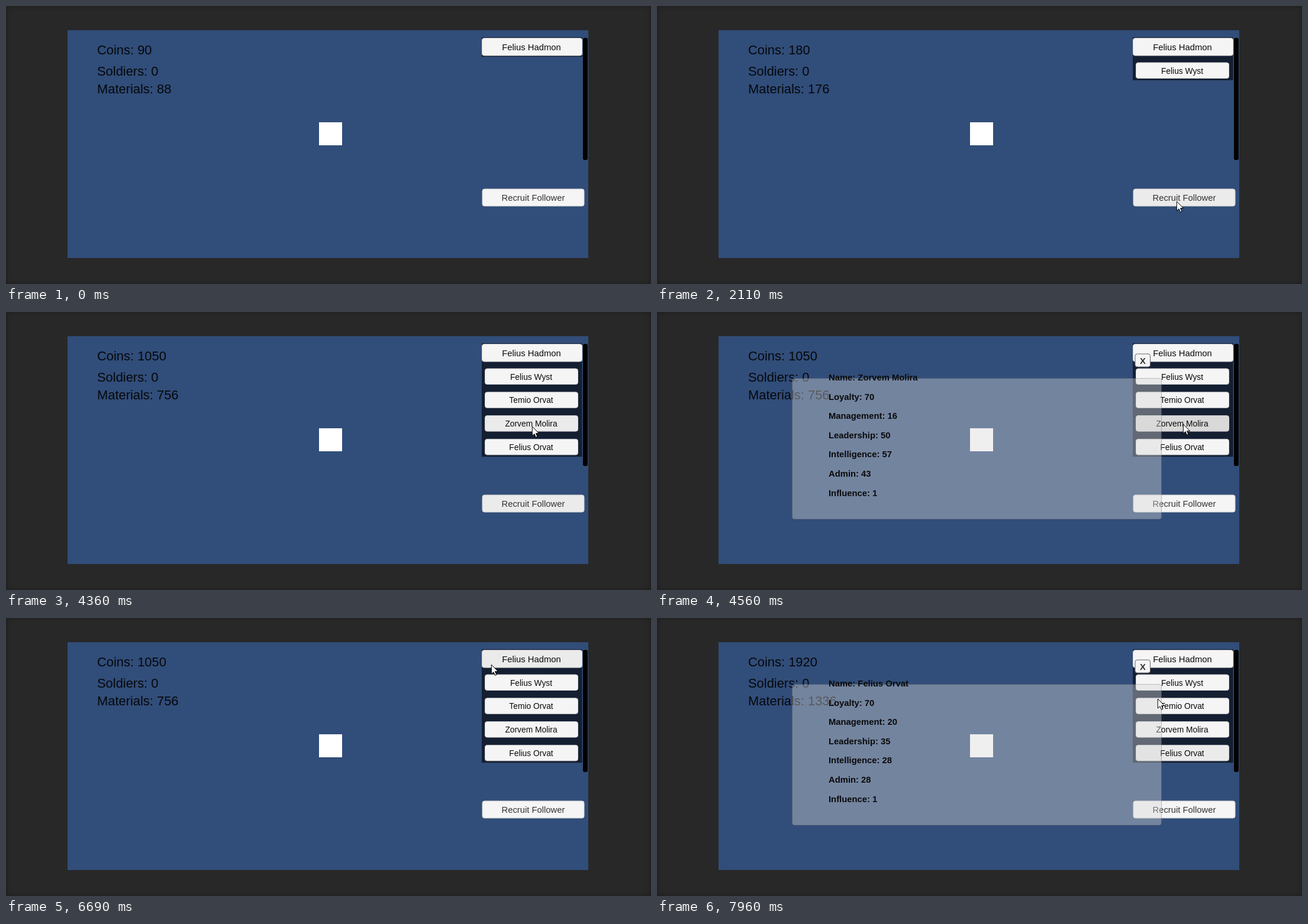
An HTML page that plays this animation: 1090x471 px, repeating every 8 s.

```html
<!DOCTYPE html>
<html lang="en">
<head>
<meta charset="utf-8">
<title>Follower menu</title>
<style>
  html, body { margin: 0; width: 100%; height: 100%; overflow: hidden; background: #282828; }
  body { box-shadow: inset 0 0 9px rgba(0, 0, 0, .3); }
  svg { display: block; width: 100%; height: 100%; }
  text { font: 14.8px "Liberation Sans", Arial, sans-serif; fill: #0a0a0a; white-space: pre; }
  .hud { font-size: 21.9px; fill: #05080c; }
  .row { font-size: 13.8px; }
  .mid { text-anchor: middle; }
  .bold { font-weight: bold; }
  .dim { fill: #323232; }
  .button { stroke: #d2d2d2; }
</style>
</head>
<body>
<svg id="stage" viewBox="0 0 1090 471" xmlns="http://www.w3.org/2000/svg"></svg>
<script>
const LOOP = 8000, FIRST_STEP = 190, STEP = 66.25;
const IDLE = '#f5f5f5', HOVER = '#ebebeb', PRESS = '#e1e1e1', HELD = '#cacaca', RELEASE = '#d9d9d9';
const LABELS = ['Name', 'Loyalty', 'Management', 'Leadership', 'Intelligence', 'Admin', 'Influence'];
const FOLLOWERS = [
  { name: 'Felius Wyst' },
  { name: 'Temio Orvat' },
  { name: 'Zorvem Molira', stats: [70, 16, 50, 57, 43, 1] },
  { name: 'Felius Orvat', stats: [70, 20, 35, 28, 28, 1] }
];

// Times are counted in animation steps. Each move: first step, last step, destination.
const ENTRY = [1000, 471];
const MOVES = [
  [0, 6, 990, 69], [6, 10, 877, 140],
  [12, 18, 878, 340], [18, 20, 876, 321], [26, 29, 878, 331],
  [54, 64, 889, 190], [76, 79, 567, 201],
  [82, 87, 820, 79], [88, 91, 840, 63], [91, 94, 820, 79],
  [99, 107, 858, 231], [110, 117, 846, 137]
];
const click = (on, at, hold = 1) => ({ on, at, hold });
const CLICKS = [
  ...FOLLOWERS.map((_, i) => click('recruit', 22 + 10 * i, 2)),
  click('row2', 65), click('close', 97), click('row3', 108)
];

const stage = document.getElementById('stage');

function add(tag, attrs, parent = stage, content = '') {
  const node = document.createElementNS(stage.namespaceURI, tag);
  for (const key in attrs) node.setAttribute(key, attrs[key]);
  node.textContent = content;
  parent.append(node);
  return node;
}
const rect = (x, y, width, height, fill, more, parent) =>
  add('rect', { x, y, width, height, fill, ...more }, parent);
const label = (x, y, cls, content, parent) => add('text', { x, y, class: cls }, parent, content);
const show = (node, on) => node.setAttribute('visibility', on ? 'visible' : 'hidden');

const buttons = {};
function button(id, x, y, w, h, parent) {
  const face = rect(x, y, w, h, IDLE, { rx: 3.5, class: 'button' }, parent);
  buttons[id] = { face, x, y, w, h };
}

rect(104, 41, 880, 386, '#314d79');
const coins = label(154, 82.2, 'hud', '');
label(154, 118.2, 'hud', 'Soldiers: 0');
const materials = label(154, 148.2, 'hud', '');
rect(529, 197, 39, 39, '#fff');

const list = rect(804, 53, 169.5, 33, '#141f32');
button('lead', 804.5, 54.5, 169, 29.5);
label(888, 75.3, 'mid', 'Felius Hadmon');
const rows = FOLLOWERS.map(({ name }, i) => {
  const row = add('g', {}), y = 96 + 39.8 * i;
  button('row' + i, 809.5, y, 157, 26.5, row);
  label(887.5, y + 18.5, 'row mid', name, row);
  return row;
});
rect(975, 54, 8, 207, '#020202', { rx: 3 });
button('recruit', 805, 310, 172, 29);
label(891, 330, 'mid dim', 'Recruit Follower');

const card = add('g', {});
rect(228.5, 112.5, 624, 238.5, '#d7d7d7', { rx: 4, 'fill-opacity': .4, stroke: '#555', 'stroke-opacity': .35 }, card);
button('close', 808, 71, 25.5, 22, card);
buttons.close.face.style.stroke = '#666';
label(821, 87.5, 'mid bold dim', 'X', card);
const facts = LABELS.map((_, i) => label(290, 116 + 32.6 * i, 'bold', '', card));

const ring = add('circle', { r: 15, fill: '#f0f02c', 'fill-opacity': .68 });
const arrow = add('path', {
  d: 'M0 0V16L3.7 12.6 6.2 18.3 8.6 17.3 6.2 11.6H11.2Z',
  fill: '#fff', stroke: '#000', 'stroke-linejoin': 'round'
});

function pointer(k) {
  let [x, y] = ENTRY;
  for (const [from, to, toX, toY] of MOVES) {
    const u = Math.min(1, Math.max(0, (k - from) / (to - from)));
    const eased = u * u * (3 - 2 * u);
    x += (toX - x) * eased;
    y += (toY - y) * eased;
  }
  return [Math.round(x), Math.round(y)];
}

function faceColor(id, k, x, y, last, cardOpen) {
  if (last && last.on === id) {
    const age = k - last.at;
    if (age < last.hold) return age ? HELD : PRESS;
    return age === last.hold ? RELEASE : HOVER;
  }
  const within = ({ x: left, y: top, w, h }) => x >= left && x <= left + w && y >= top && y <= top + h;
  const covered = cardOpen && id !== 'close' && (within(buttons.close) || (x < 853 && y > 112));
  return k >= 0 && within(buttons[id]) && !covered ? HOVER : IDLE;
}

function draw(time) {
  const k = Math.floor((time - FIRST_STEP + 4) / STEP);
  const [x, y] = pointer(k);
  const last = CLICKS.filter(c => c.at <= k).pop();
  const released = CLICKS.filter(c => c.at + c.hold <= k);
  const hired = released.filter(c => c.on === 'recruit').length;
  const opened = FOLLOWERS.find((_, i) => released.at(-1)?.on === 'row' + i);

  // Income arrives every three seconds, and rises after the first payment.
  const ticks = Math.floor((k + 30) / 45);
  const total = (low, high) => low * Math.min(ticks + 1, 2) + high * Math.max(ticks - 1, 0);
  coins.textContent = 'Coins: ' + total(90, 870);
  materials.textContent = 'Materials: ' + total(88, 580);

  list.setAttribute('height', 33 + 39.8 * hired);
  rows.forEach((row, i) => show(row, i < hired));
  for (const id in buttons)
    buttons[id].face.setAttribute('fill', faceColor(id, k, x, y, last, opened));

  show(card, opened);
  if (opened)
    [opened.name, ...opened.stats].forEach((value, i) => facts[i].textContent = LABELS[i] + ': ' + value);

  show(arrow, k >= 0);
  arrow.setAttribute('transform', `translate(${x + .3} ${y})`);
  show(ring, last && k < last.at + last.hold);
  ring.setAttribute('cx', x - 1);
  ring.setAttribute('cy', y);
}

const start = performance.now();
function frame() {
  draw((performance.now() - start) % LOOP);
  requestAnimationFrame(frame);
}
frame();
</script>
</body>
</html>
```
